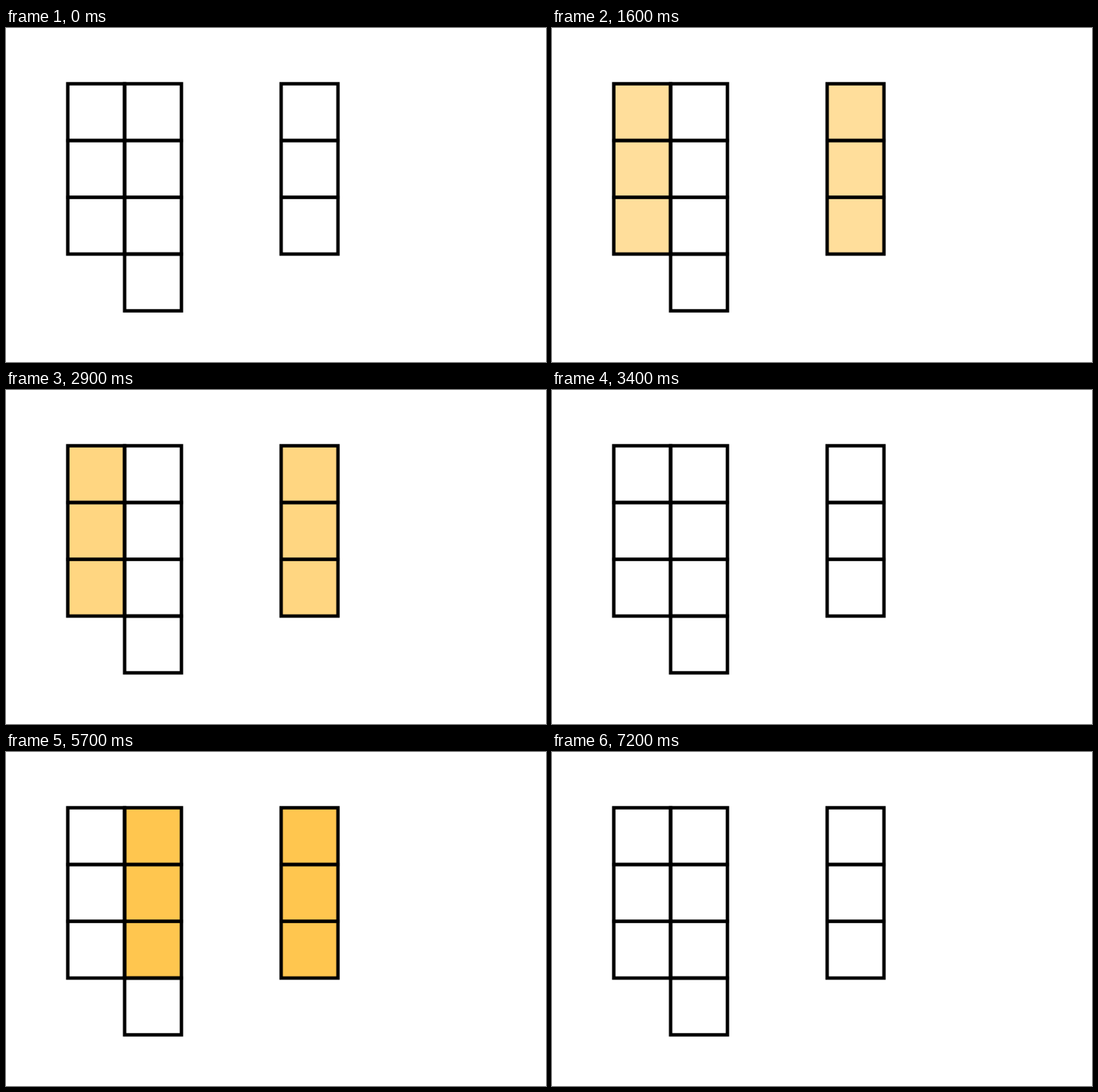
An HTML page for the animation above (8 s loop, 898 by 556 pixels).

```html
<!DOCTYPE html>
<html lang="en">
<head>
<meta charset="utf-8">
<title>Column highlights</title>
<style>
  html, body { margin: 0; width: 100%; height: 100%; overflow: hidden; background: #fff; }
  svg { display: block; width: 898px; height: 556px; }
  .lines { fill: none; stroke: #000; stroke-width: 5.67; }
  .fill { fill: #ffc64f; opacity: 0; animation: blink 8s infinite; }
  .second { animation-delay: -4.2s; }

  /* Fade in from 1.3 s and out from 2.8 s, one step every 100 ms */
  @keyframes blink {
    0% { opacity: 0; }
    16.25% { opacity: 0; animation-timing-function: steps(7, start); }
    25% { opacity: 1; }
    35% { opacity: 1; animation-timing-function: steps(7, start); }
    43.75%, 100% { opacity: 0; }
  }
</style>
</head>
<body>
<svg viewBox="0 0 898 556">
  <defs>
    <rect id="cell" width="94.5" height="94.5"/>
    <g id="column">
      <use href="#cell"/>
      <use href="#cell" y="94.5"/>
      <use href="#cell" y="189"/>
    </g>
  </defs>
  <g transform="translate(102.7 92.8)">
    <g class="fill">
      <rect width="94.5" height="283.5"/>
      <rect x="354.8" width="94.5" height="283.5"/>
    </g>
    <g class="fill second">
      <rect x="94.5" width="94.5" height="283.5"/>
      <rect x="354.8" width="94.5" height="283.5"/>
    </g>
    <g class="lines">
      <use href="#column"/>
      <use href="#column" x="94.5"/>
      <use href="#cell" x="94.5" y="283.5"/>
      <use href="#column" x="354.8"/>
    </g>
  </g>
</svg>
</body>
</html>
```
